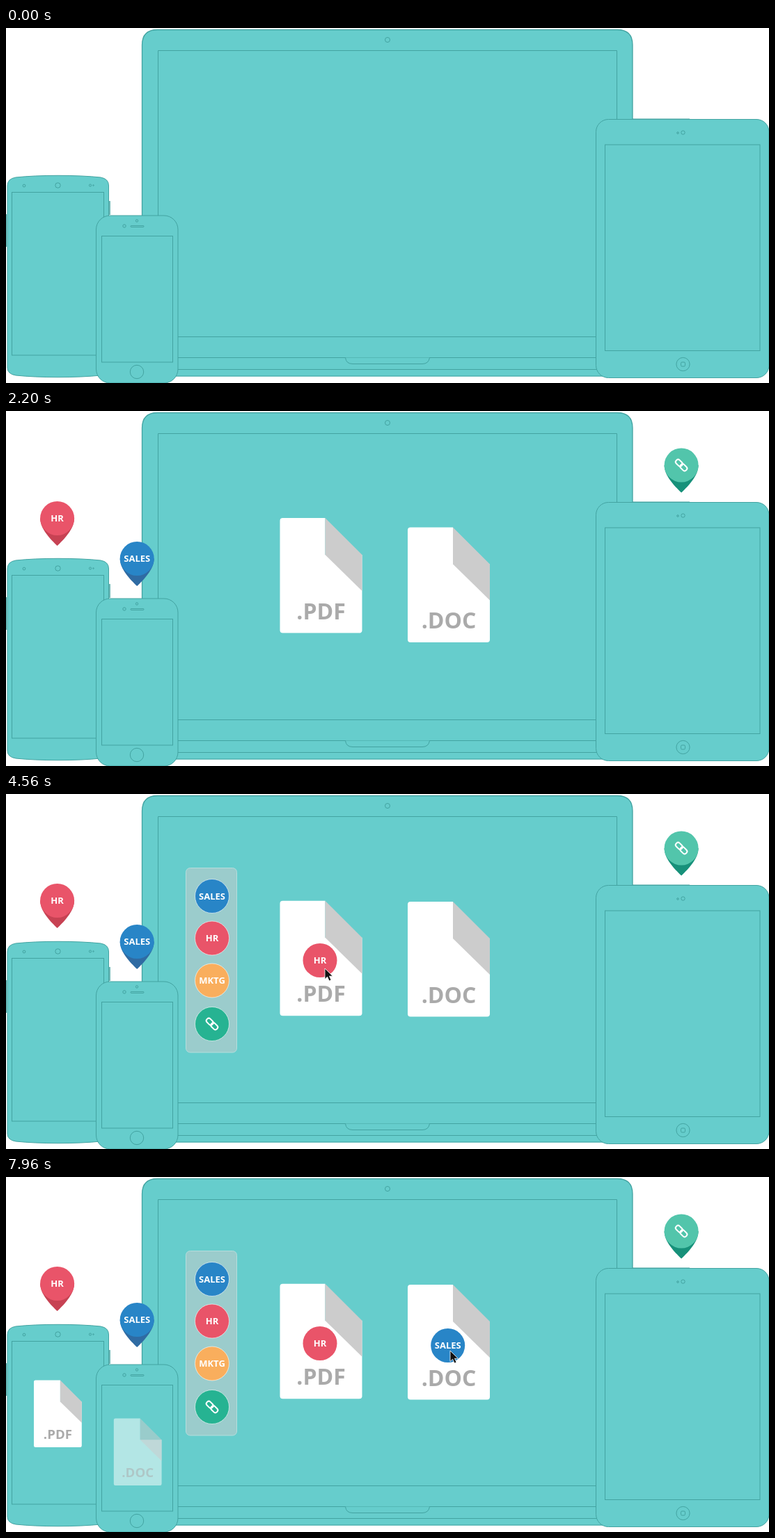
These frames come from a looping animation (1096x511 px, 8000 ms). An HTML page:

```html
<!DOCTYPE html>
<html lang="en">
<head>
<meta charset="utf-8">
<title>Drag to share</title>
<style>
html, body { margin: 0; width: 100%; height: 100%; overflow: hidden; background: #fff; }
svg { display: block; }
text { font-family: "Open Sans", sans-serif; font-weight: 700; text-anchor: middle; }
.tag { font-size: 13px; fill: #fff; }
.ext { font-size: 32px; fill: #aaa; }
.dev { fill: #66cdcc; stroke: #43a3a1; stroke-width: 1; }
.doc > * { opacity: var(--o, 1); }
.ring { stroke: #fff; stroke-opacity: .6; }
.link { fill: none; stroke: #fff; stroke-width: 2; }
</style>
</head>
<body>
<svg width="1096" height="511" viewBox="0 0 1096 511">
  <defs>
    <g id="link" class="link" transform="rotate(45)">
      <rect x="-10" y="-3.4" width="10.8" height="6.8" rx="3"/>
      <rect x="-.8" y="-3.4" width="10.8" height="6.8" rx="3"/>
    </g>
    <g id="sheet">
      <path d="M4 0H65V53H118V161.5Q118 165.5 114 165.5H4Q0 165.5 0 161.5V4Q0 0 4 0Z" fill="#fff"/>
    </g>
    <path id="fold" d="M65 0L118 53V105L65 53Z" fill="#ccc"/>
  </defs>

  <g class="dev">
    <path d="M195.5 501.5V24.500Q195.500 2.500 217.500 2.500H878Q900 2.500 900 24.500V501.500Z" stroke="none"/>
    <path d="M195.500 474V24.500Q195.500 2.500 217.500 2.500H878Q900 2.500 900 24.500V474" stroke-width="1.300"/>
    <path d="M218.500 444.500V32.500H877.500V444.500M195.500 444.500H900M195.500 474.500H900M195.500 491.500H900M195.500 501H900" fill="none"/>
    <path d="M487.500 474.500Q488.500 483.500 498 483.500H598Q607 483.500 608.500 474.500"/>
    <circle cx="548" cy="17" r="3.500"/>
  </g>

  <g class="dev">
    <rect x="847.500" y="131.500" width="248.500" height="372" rx="18"/>
    <path d="M900 131.200H982" stroke-width="1.500"/>
    <rect x="860.500" y="168" width="222.500" height="296.500"/>
    <circle cx="972.500" cy="150.500" r="2.700"/>
    <circle cx="965" cy="151" r="1.300"/>
    <circle cx="972.500" cy="484" r="9.600"/>
    <rect x="969.500" y="481" width="6" height="6" rx="1.500"/>
  </g>

  <g class="dev">
    <path d="M.5 268V315M149 249V269" stroke-width="1.500"/>
    <path d="M2 227Q2 217 14 215Q40 212.300 75 212.300T136 215Q147.500 217 147.500 227V489Q147.500 498 136 500Q110 502.700 75 502.700T14 500Q2 498 2 489Z"/>
    <rect x="8.500" y="236.500" width="132" height="234.500"/>
    <circle cx="26" cy="227" r="1.900"/>
    <circle cx="74.500" cy="226.500" r="3.700"/>
    <circle cx="121" cy="226.500" r="1.600"/>
    <circle cx="125.500" cy="226.500" r=".8"/>
  </g>

  <g class="dev">
    <rect x="129.500" y="270" width="117.500" height="241" rx="20"/>
    <rect x="137.500" y="299.500" width="102" height="181.500"/>
    <circle cx="188" cy="277.500" r="1.700"/>
    <circle cx="170" cy="285" r="2.200"/>
    <rect x="179" y="284.500" width="19" height="2" rx="1"/>
    <circle cx="188" cy="495" r="9.700"/>
  </g>

  <g id="scene"></g>
</svg>
<script>
const LOOP = 8000;
const scene = document.getElementById('scene');

function group(html) {
  const g = document.createElementNS('http://www.w3.org/2000/svg', 'g');
  g.innerHTML = html;
  scene.append(g);
  return g;
}

const label = s => s ? `<text class="tag" y="4.5">${s}</text>` : '<use href="#link"/>';
const disc = (color, s, cls = '') => `<circle class="${cls}" r="24.500" fill="${color}"/>${label(s)}`;
const pin = (color, dark, s) => group(
  `<path d="M-24.500 0C-24.500 15-10 30 0 39.500C10 30 24.500 15 24.500 0Z" fill="${dark}"/>` + disc(color, s));

function doc(ext) {
  const g = group(`<use href="#sheet"/><use href="#fold"/><text class="ext" x="59" y="145.500">${ext}</text>`);
  g.setAttribute('class', 'doc');
  return g;
}

const RED = '#e95469', BLUE = '#2885c7', ORANGE = '#f9ae5d', GREEN = '#26b392';

const pins = {
  hr: pin(RED, '#c74253', 'HR'),
  sales: pin(BLUE, '#2f6ba3', 'SALES'),
  link: pin('#52c5ab', '#17917a', '')
};
const pdf = doc('.PDF'), word = doc('.DOC');
const phonePdf = doc('.PDF'), phoneWord = doc('.DOC');

const panel = group(
  '<rect x="258.500" y="106.500" width="73" height="265.500" rx="6" fill="#9bcccc" stroke="#b5dedd"/>' +
  [[147, BLUE, 'SALES'], [207.5, RED, 'HR'], [268.5, ORANGE, 'MKTG'], [331, GREEN, '']]
    .map(([y, c, s]) => `<g transform="translate(296 ${y})">${disc(c, s, 'ring')}</g>`).join(''));

const dragHr = group(disc(RED, 'HR'));
const dragSales = group(disc(BLUE, 'SALES'));
const arrow = group('<path d="M0 0V15.500L3.600 12.200L6.200 18L9 16.700L6.500 11.200H11.300Z" fill="#111" stroke="#fff" stroke-width=".8"/>');
const hand = group('<path d="M-5-2Q-4.500-5-2.500-4.500Q-1-6.500 1-5Q3-6 4-4Q6.500-4 6 0Q6 3 4 6H-3Q-7 1-5-2Z" fill="#fff" stroke="#333" stroke-width=".9"/><path d="M-2-4V-1M1-4V-1M3.700-3.500V-1" stroke="#555" stroke-width=".8"/>');

const clamp = x => Math.max(0, Math.min(1, x));
const part = (t, start, length) => clamp((t - start) / length);
const ease = u => u < .5 ? 2 * u * u : 1 - 2 * (1 - u) * (1 - u);

// Eased value from [time, value] steps
function track(t, steps) {
  let [t0, v0] = steps[0];
  for (const [t1, v1] of steps) {
    if (t < t1) return t <= t0 ? v0 : v0 + (v1 - v0) * ease((t - t0) / (t1 - t0));
    [t0, v0] = [t1, v1];
  }
  return v0;
}

// Point on a quadratic curve
const curve = (u, a, c, b) => [0, 1].map(i =>
  (1 - u) * (1 - u) * a[i] + 2 * u * (1 - u) * c[i] + u * u * b[i]);

function place(g, x, y, opacity = 1, scale = 1) {
  g.setAttribute('transform', `translate(${x} ${y}) scale(${scale})`);
  g.style.display = opacity > 0 ? '' : 'none';
  if (g.classList.contains('doc')) g.style.setProperty('--o', opacity);
  else g.style.opacity = opacity;
}

const drop = (t, s) => track(t, [[s, -19], [s + 280, 8], [s + 500, -3], [s + 720, 0]]);
const hop = (t, s) => t > s && t < s + 640 ? -7 * Math.abs(Math.sin(Math.PI * (t - s) / 320)) : 0;

const HR_SENT = 4665, SALES_SENT = 7800;

function deliver(g, t, start, x, y) {
  place(g, x, y + 22 * (1 - ease(part(t, start, 750))), part(t, start, 320), .583);
}

function drawCursor(t, hr, sales) {
  let p = null, held = null;
  if (t >= 3400 && t < 3840) p = curve(ease(part(t, 3440, 360)), [413, 247], [360, 240], [303, 215]);
  else if (t >= 3840 && t < 4357) held = hr;
  else if (t >= 4357 && t < 6210) p = curve(part(t, 5590, 550), [458, 251], [379.5, 238.3], [301, 153]);
  else if (t >= 6210 && t < 7360) held = sales;
  else if (t >= 7360) p = [638, 250];
  place(arrow, ...(p || [0, 0]), p ? part(t, 3400, 120) : 0);
  place(hand, ...(held ? [held[0] + 3, held[1] + 11] : [0, 0]), held ? 1 : 0);
}

function draw(t) {
  const drift = track(t, [[1240, 0], [1600, 1], [2600, 1], [2800, 2], [3400, 0]]);
  place(pins.sales, 188.2, 212.5 + drop(t, 20) + hop(t, SALES_SENT), part(t, 20, 200));
  place(pins.hr, 73.6, 153.5 + drop(t, 400) + drift + hop(t, HR_SENT), part(t, 400, 200));
  place(pins.link, 970.1, 78 + drop(t, 340), part(t, 340, 200));

  place(pdf, 393.5, 153.7 + track(t, [[1700, 36], [2240, 0]]), part(t, 1700, 320));
  place(word, 577, 155 + track(t, [[1860, 35], [2460, -1], [2840, -1], [3300, 0]]), part(t, 1860, 320));
  place(panel, 0, 0, part(t, 2840, 400));

  const hr = curve(part(t, 3840, 517), [296, 207.5], [373.5, 210], [451, 239.5]);
  const sales = curve(part(t, 6210, 1150), [296, 147], [465.5, 125], [634.7, 242.5]);
  place(dragHr, ...hr, t >= 3840 ? 1 : 0);
  place(dragSales, ...sales, t >= 6210 ? 1 : 0);
  drawCursor(t, hr, sales);

  deliver(phonePdf, t, HR_SENT, 40, 292.5);
  deliver(phoneWord, t, SALES_SENT, 154.8, 327.5);
}

const begin = performance.now();
function tick() {
  draw((performance.now() - begin) % LOOP);
  requestAnimationFrame(tick);
}
tick();
</script>
</body>
</html>
```
